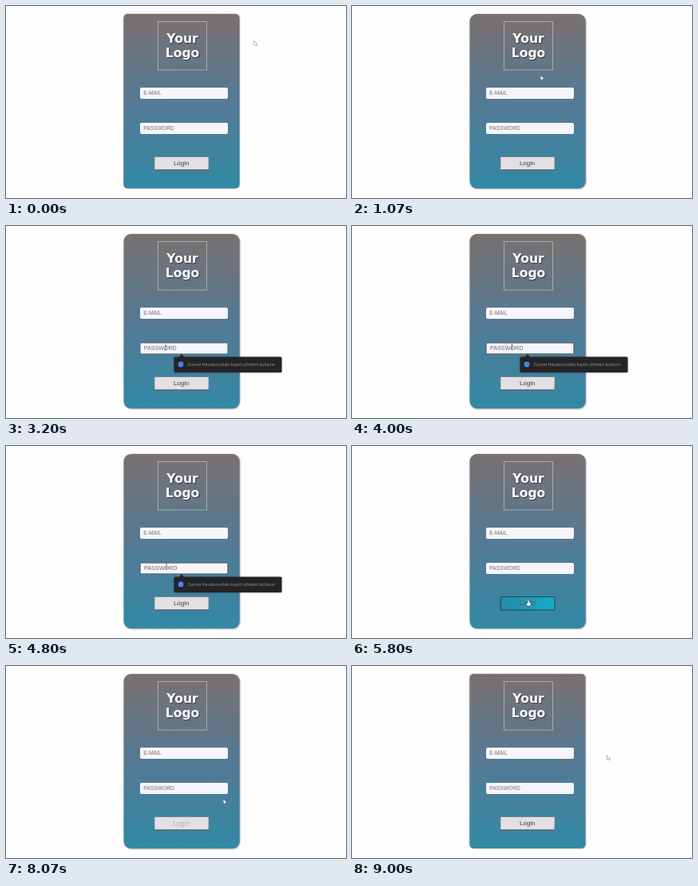
These frames come from a looping animation (426 px wide and 240 px high, 9.07 s). An HTML page with a canvas:

```html
<!DOCTYPE html>
<html lang="en">
<head>
<meta charset="utf-8">
<title>Login form</title>
<style>
  html, body { margin: 0; width: 100%; height: 100%; overflow: hidden; background: #fdfdfd; }
  canvas { display: block; width: 100vw; height: 100vh; }
</style>
</head>
<body>
<canvas id="stage"></canvas>
<script>
const WIDTH = 426, HEIGHT = 240, LOOP = 9070, STEP = 1000 / 15;
const SANS = '"Liberation Sans", Arial, sans-serif';
const canvas = document.getElementById('stage');
const ctx = canvas.getContext('2d');
const density = window.devicePixelRatio || 1;
canvas.width = WIDTH * density;
canvas.height = HEIGHT * density;

// Pointer path: time in ms, x, y
const PATH = [
  [0, 311, 44], [330, 308, 47], [1070, 236.5, 87], [1550, 221, 108],
  [2150, 220, 110], [2750, 200, 152], [3200, 200, 152], [4800, 201, 150],
  [5130, 201, 151], [5600, 221, 193], [5800, 221, 193.5], [6350, 222, 196],
  [7130, 240.5, 200], [7700, 241, 199], [8500, 313, 125], [9070, 320, 111]
];

const clamp = v => Math.max(0, Math.min(1, v));
const ease = v => v * v * (3 - 2 * v);
const mix = (a, b, k) => a + (b - a) * k;
const grey = (v, alpha = 1) => `rgba(${v},${v},${v},${alpha})`;

// Rises after `start` and falls after `end`, each over `duration`
const phase = (t, start, end, duration) =>
  ease(clamp((t - start) / duration)) - ease(clamp((t - end) / duration));

const buttonHovered = t => t >= 5550 && t < 7850;

function pointerAt(t) {
  const i = Math.max(1, PATH.findIndex(p => p[0] >= t));
  const [t0, x0, y0] = PATH[i - 1], [t1, x1, y1] = PATH[i];
  const k = ease((t - t0) / (t1 - t0));
  return [mix(x0, x1, k), mix(y0, y1, k)];
}

function box(x, y, w, h, radius, fill, stroke, line = 1) {
  ctx.beginPath();
  ctx.roundRect(x, y, w, h, radius);
  if (fill) { ctx.fillStyle = fill; ctx.fill(); }
  if (stroke) { ctx.strokeStyle = stroke; ctx.lineWidth = line; ctx.stroke(); }
}

function gradient(x0, y0, x1, y1, ...colors) {
  const g = ctx.createLinearGradient(x0, y0, x1, y1);
  colors.forEach((c, i) => g.addColorStop(i / (colors.length - 1), c));
  return g;
}

function label(text, x, y, font, fill, align = 'left') {
  ctx.font = font;
  ctx.fillStyle = fill;
  ctx.textAlign = align;
  ctx.fillText(text, x, y);
}

function shadow(color, x, y, blur) {
  ctx.shadowColor = color;
  ctx.shadowOffsetX = x * density;
  ctx.shadowOffsetY = y * density;
  ctx.shadowBlur = blur * density;
}

function drawCard(hover) {
  ctx.save();
  shadow('rgba(90,65,75,.75)', mix(0, 0.6, hover), mix(0, 0.6, hover), 2);
  box(147.5, 10, 145, 218, mix(5, 9, hover),
    gradient(0, 10, 0, 228, '#79706f', '#557a95', '#3189a6'));
  ctx.restore();
  box(190.5, 19.5, 61, 60.5, 0, null, 'rgba(225,222,215,.65)', 0.8);
  ctx.save();
  shadow('rgba(30,25,35,.65)', 0.9, 0.9, 1);
  const font = 'bold 15.6px "DejaVu Sans", Verdana, sans-serif';
  label('Your', 221, 45.8, font, '#fff', 'center');
  label('Logo', 221, 64.2, font, '#fff', 'center');
  ctx.restore();
}

function drawField(text, y, focus) {
  box(168, y, 110, 14, 2, '#f6f5fa');
  if (focus > 0) box(168.3, y + 0.3, 109.4, 13.4, 1.5, null, grey(35, focus), 0.6);
  label(text, mix(172.3, 173, focus), y + 9.4,
    `${mix(6.7, 7.2, focus)}px ${SANS}`, grey(Math.round(mix(112, 105, focus))));
}

function drawButton(t) {
  const k = phase(t, 5680, 7850, 500);
  if (buttonHovered(t)) {
    box(186, 188.5, 68, 16.5, 1, gradient(186, 0, 254, 0, '#278aa6', '#15acc6'),
      `rgba(20,55,75,${1 - k * 0.85})`, 0.9);
  } else {
    box(186, 188.5, 68, 16.5, 1, '#e2e0e4', '#77747a', 0.7);
    ctx.fillStyle = '#4d4a50';
    ctx.fillRect(186, 204.5, 68, 0.8);
  }
  label('Login', 219.7, mix(199.2, 199.8, k), `${mix(8, 9.1, k)}px ${SANS}`,
    grey(Math.round(mix(60, 255, k))), 'center');
}

function drawTip() {
  ctx.save();
  shadow('rgba(0,0,0,.4)', 0, 0.5, 2);
  box(210.5, 163.5, 135, 19.5, 1.5, '#242427');
  ctx.restore();
  ctx.fillStyle = '#242427';
  ctx.beginPath();
  ctx.moveTo(216.5, 164);
  ctx.lineTo(220, 160);
  ctx.lineTo(223.5, 164);
  ctx.fill();
  ctx.fillStyle = '#4285f4';
  ctx.beginPath();
  ctx.arc(219, 173, 3.4, 0, Math.PI * 2);
  ctx.fill();
  label('Zuvnel Hesabınızdaki kayıtlı şifreleri kullanın', 227.5, 175.2,
    '5.35px "Open Sans", "Noto Sans", sans-serif', '#98989b');
}

function outline(d, fill, stroke) {
  const path = new Path2D(d);
  ctx.lineJoin = 'round';
  ctx.lineWidth = 0.6;
  ctx.strokeStyle = stroke;
  ctx.fillStyle = fill;
  ctx.stroke(path);
  ctx.fill(path);
}

function drawPointer(t, x, y) {
  const overField = x > 168 && x < 278 && ((y > 102 && y < 116) || (y > 146 && y < 160));
  ctx.save();
  ctx.translate(x, y);
  if (overField) {
    outline('M-1.3-3H1.3M0-3V3M-1.3 3H1.3', 'transparent', '#444');
  } else if (buttonHovered(t)) {
    outline('M-.8 0Q0-.9.8 0V2L3 2.5V4.5L2.1 6.2H-1.2L-2.8 3.5-1.8 2.9-.8 3.7Z', '#fff', '#222');
  } else {
    outline('M0 0V5.3L1.2 4.2 2 6 2.9 5.6 2.1 3.9H3.7Z', '#fff', '#333');
  }
  ctx.restore();
}

function draw(now) {
  const t = Math.floor(((now % LOOP) + 4) / STEP) * STEP;
  const [x, y] = pointerAt(t);
  ctx.setTransform(density, 0, 0, density, 0, 0);
  ctx.fillStyle = '#fdfdfd';
  ctx.fillRect(0, 0, WIDTH, HEIGHT);
  drawCard(phase(t, 450, 8200, 400));
  drawField('E-MAIL', 102, phase(t, 1700, 2800, 400));
  drawField('PASSWORD', 146, phase(t, 2850, 5200, 500));
  drawButton(t);
  if (t >= 2850 && t < 5250) drawTip();
  drawPointer(t, x, y);
  requestAnimationFrame(() => draw(performance.now() - start));
}

const start = performance.now();
draw(0);
</script>
</body>
</html>
```
